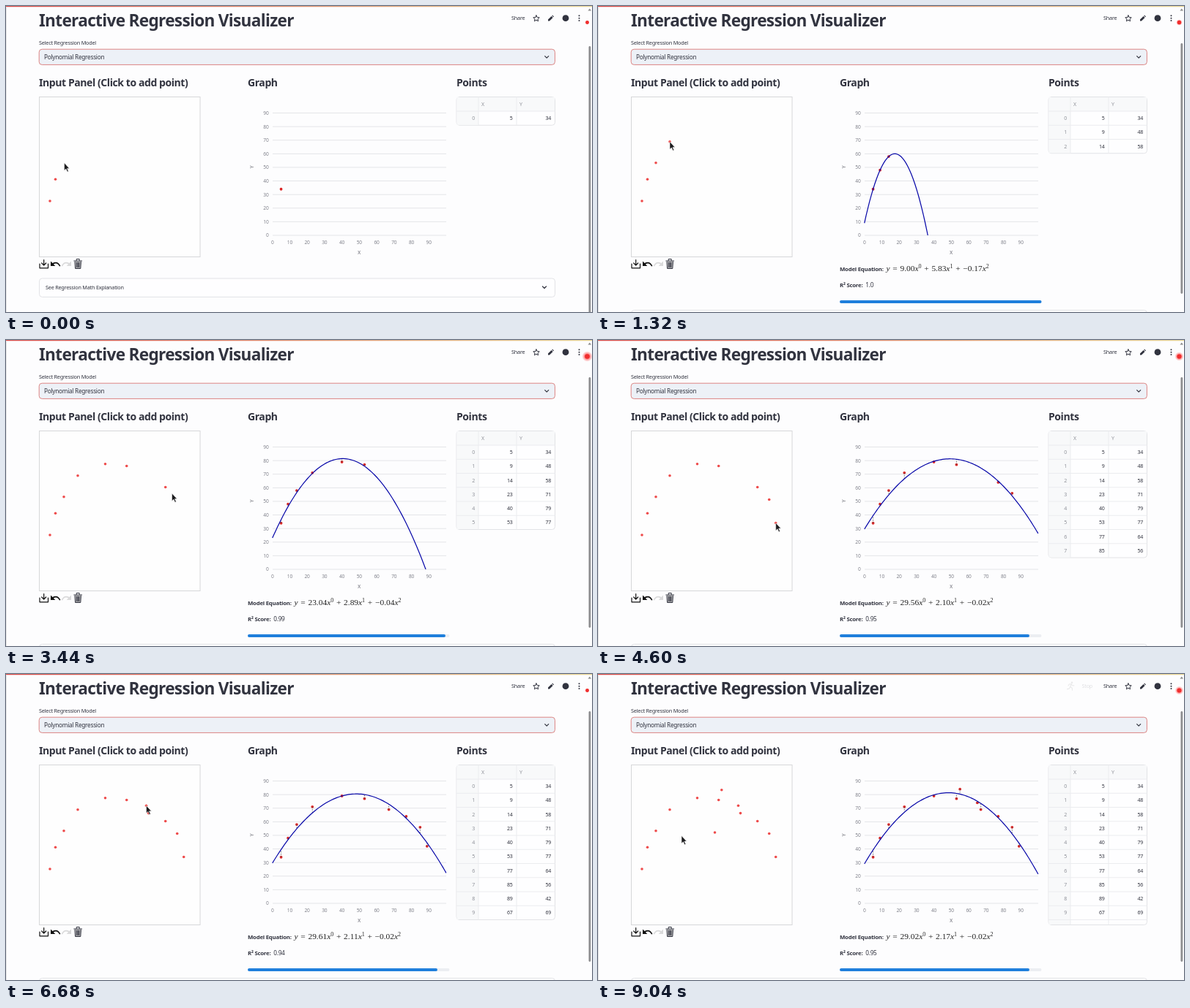
An HTML page that plays this animation: 800 by 419 pixels, repeating every 9080 ms.

```html
<!DOCTYPE html>
<html lang="en">
<head>
<meta charset="utf-8">
<title>Interactive Regression Visualizer</title>
<style>
  html, body { margin: 0; width: 100%; height: 100%; overflow: hidden; background: #fdfdfe; }
  svg { display: block; width: 800px; height: 419px; }
  text { font-family: "Noto Sans", "Open Sans", sans-serif; letter-spacing: -.03em; fill: #31333f; }
  .h1 { font-size: 22.6px; font-weight: 700; }
  .h3 { font-size: 14px; font-weight: 600; }
  .body { font-size: 8.2px; }
  .strong { font-size: 7.8px; font-weight: 600; }
  .small { font-size: 7.25px; }
  .cell { font-size: 7px; }
  .axis { font-size: 6.6px; fill: #80828b; }
  .name { fill: #5f616b; }
  .dim { fill: #8f9199; }
  .end { text-anchor: end; }
  .mid { text-anchor: middle; }
  .math { font: 11.4px "Liberation Serif", serif; letter-spacing: 0; word-spacing: .9px; fill: #222; }
  .math .v { font-style: italic; }
  .math .sup { font-size: 8px; }
  .line { fill: none; stroke: #31333f; stroke-width: 1.2; stroke-linecap: round; stroke-linejoin: round; }
  .box { fill: #fefeff; stroke: #e2e3e6; }
  .rule { fill: none; stroke: #ebecef; stroke-width: 1; }
</style>
</head>
<body>
<svg viewBox="0 0 800 419">
  <defs>
    <linearGradient id="strip"><stop stop-color="#d94a48"/><stop offset="1" stop-color="#e9d795"/></linearGradient>
    <radialGradient id="glow"><stop offset=".4" stop-color="#ff3b3b" stop-opacity=".7"/><stop offset="1" stop-color="#ff3b3b" stop-opacity="0"/></radialGradient>
    <clipPath id="plot"><rect x="363" y="128" width="238.5" height="186"/></clipPath>
    <clipPath id="sheet"><rect x="614" y="123.5" width="137" height="220.5"/></clipPath>
  </defs>
  <rect width="800" height="1.2" fill="url(#strip)"/>
  <path d="M.5 1V419" stroke="#e4e4e6"/>

  <text class="h1" x="45" y="28">Interactive Regression Visualizer</text>
  <text class="small" x="45" y="52.5">Select Regression Model</text>
  <rect x="45.2" y="59.2" width="704.2" height="21.2" rx="4" fill="#edf1f7" stroke="#dc8583"/>
  <text class="body" x="52" y="73">Polynomial Regression</text>
  <path class="line" d="M735.7 68.7l2.5 2.5l2.5-2.5"/>
  <text class="h3" x="45" y="110">Input Panel (Click to add point)</text>
  <text class="h3" x="330" y="110">Graph</text>
  <text class="h3" x="615" y="110">Points</text>

  <text class="small" x="690" y="19.3">Share</text>
  <path class="line" style="stroke-width:1" d="M724 12.8l1.2 2.7l3 .3l-2.2 2l.6 3l-2.6-1.6l-2.6 1.6l.6-3l-2.2-2l3-.3z"/>
  <path d="M740 20.5v-2l4.6-4.6l2 2l-4.6 4.6zM745.2 13.3l.8-.8l2 2l-.8.8z" fill="#31333f"/>
  <circle cx="764" cy="16.7" r="4.4" fill="#31333f"/>
  <g fill="#31333f"><circle cx="782.5" cy="13.3" r="1"/><circle cx="782.5" cy="16.7" r="1"/><circle cx="782.5" cy="20.1" r="1"/></g>
  <path d="M794.5 6.5l2.3-3l2.3 3z" fill="#8b8b8b"/>

  <rect x="45.5" y="124.5" width="219.5" height="219" fill="#fefefe" stroke="#d6d7d9"/>
  <path class="line" style="stroke:#111" d="M51.7 347.5v7.5m-3-3l3 3l3-3M46 353v5.8h11.5v-5.8"/>
  <path id="undo" d="M61 349.5v6.5h6.3l-2.4-2.4q5-3 8 3l1.6-.7q-4-8-11-3.8z" fill="#111"/>
  <use href="#undo" transform="matrix(-1 0 0 1 150 0)" opacity=".15"/>
  <path d="M94 349.5h8.4l-.8 10h-6.8z" fill="#a9a9ac"/>
  <path class="line" style="stroke-width:1" d="M92.8 349h10.8M96.2 348.5v-2h4v2M94 350.5l.6 9h7.2l.6-9M96.7 351.5v6M98.2 351.5v6M99.8 351.5v6"/>

  <g id="axes"></g>
  <g id="result"></g>
  <g id="dots" fill="#ee4b4b"></g>
  <g id="running">
    <circle cx="647" cy="11.8" r="1.3" fill="#777"/>
    <path class="line" style="stroke:#777;stroke-width:1.1" d="M646 13.5l-1.3 4l2.6 1.8l.2 3M644.7 17.5l-1.5 2.6l-2.7.5M642 15.8l1.5-2l2.5-.2l1.7 2.2l2 .1"/>
    <text class="small" x="660.5" y="19.3">Stop</text>
  </g>
  <circle id="halo" cx="793.5" cy="22.5" fill="url(#glow)"/>
  <circle id="rec" cx="793.5" cy="22.5" fill="#f02e2e"/>
  <path id="cursor" d="M0 0V10.4L2.4 8.2L4.2 12.3L5.8 11.6L4 7.6H7Z" fill="#1c1c1e" stroke="#fff" stroke-width=".5"/>
</svg>
<script>
const LOOP = 9080, LAG = 600;
// panel x, panel y, click time, data x, data y
const points = [
  [60, 267, -900, 5, 34], [67.5, 237.3, -150, 9, 48], [79, 214.8, 150, 14, 58],
  [98, 185.8, 1250, 23, 71], [135.5, 169.8, 1800, 40, 79], [164.7, 172.5, 2080, 53, 77],
  [217.7, 201.5, 3150, 77, 64], [233.7, 218.5, 3700, 85, 56], [242.7, 250.5, 4560, 89, 42],
  [194.5, 190.6, 5700, 67, 69], [191.5, 180.2, 6640, 65, 74], [168.8, 158.8, 7500, 55, 84],
  [159.5, 217, 8650, 51, 57]
];
const path = [[0, 79.5, 214.8], [2360, 197.5, 182], [3440, 226.5, 210], [9040, 114, 221.5]];
for (const [x, y, t] of points.slice(2)) path.push([t - 80, x, y], [t + 80, x, y]);
path.sort((a, b) => a[0] - b[0]);

const $ = id => document.getElementById(id);
const px = x => 363.7 + 2.372 * x;
const py = y => 314 - 1.861 * y;
const clamp = v => Math.max(0, Math.min(1, v));
const sum = (list, f) => list.reduce((s, v) => s + f(v), 0);
const text = (cls, x, y, s, more = '') => `<text class="${cls}" x="${x}" y="${y}" ${more}>${s}</text>`;

function drawAxes() {
  let out = text('axis name mid', 482, 339.5, 'X')
    + text('axis name mid', 0, 0, 'Y', 'transform="translate(337.5 220.5) rotate(-90)"');
  for (let v = 0; v < 100; v += 10) {
    out += `<path d="M364 ${py(v)}H601" stroke="#e4e5e8"/>`
      + text('axis end', 358.5, py(v) + 2.4, v) + text('axis mid', px(v), 325.7, v);
  }
  $('axes').innerHTML = out;
}

// Quadratic least squares; the tiny ridge gives the minimum-norm answer for two points.
function fit(data) {
  const n = data.length, ridge = 1e-6;
  const mx = sum(data, p => p[0]) / n, mz = sum(data, p => p[0] ** 2) / n, my = sum(data, p => p[1]) / n;
  const cov = (f, g) => sum(data, p => f(p) * g(p));
  const dx = p => p[0] - mx, dz = p => p[0] ** 2 - mz, dy = p => p[1] - my;
  const xx = cov(dx, dx) + ridge, zz = cov(dz, dz) + ridge, xz = cov(dx, dz), xy = cov(dx, dy), zy = cov(dz, dy);
  const det = xx * zz - xz * xz;
  const b = (xy * zz - zy * xz) / det, c = (zy * xx - xy * xz) / det, a = my - b * mx - c * mz;
  const at = x => a + b * x + c * x * x;
  return { coef: [a, b, c], at, r2: 1 - sum(data, p => (p[1] - at(p[0])) ** 2) / cov(dy, dy) };
}

function table(data) {
  const row = 19.25, bottom = Math.min(343.5, 144 + row * data.length), h = bottom - 124.5;
  let out = `<rect class="box" x="615" y="124.5" width="134.5" height="${h}" rx="4"/>
    <path d="M615.5 125H749V144H645V${bottom - .5}H615.5Z" fill="#f8f9fa"/>
    <path class="rule" d="M645 124.5V${bottom}M697 124.5V${bottom}"/>`
    + text('cell dim', 649, 136.7, 'X') + text('cell dim', 701, 136.7, 'Y');
  data.forEach(([x, y], i) => {
    const top = 144 + row * i, base = top + 12.2;
    out += `<path class="rule" d="M615 ${top}H749.5"/>` + text('cell dim end', 640, base, i)
      + text('cell end', 691.5, base, x) + text('cell end', 744, base, y);
  });
  return `<g clip-path="url(#sheet)">${out}</g>`;
}

function model(data) {
  const { coef, at, r2 } = fit(data);
  const curve = Array.from({ length: 101 }, (_, x) => `${px(x)} ${py(at(x)).toFixed(2)}`).join('L');
  const gaps = data.map(([x, y]) => `M${px(x)} ${py(y)}V${py(at(x))}`).join('');
  const terms = coef.map((c, i) => `${c.toFixed(2).replace('-', '−')}<tspan class="v">x</tspan><tspan class="sup" dy="-4">${i}</tspan>`);
  const score = r2 > .995 ? '1.0' : String(+r2.toFixed(2));
  const width = 275.5 * Math.floor(r2 * 100 + 1e-3) / 100;
  return {
    curve: `<path d="${gaps}" stroke="#555" stroke-width=".8" stroke-dasharray="1.6 1.6"/>
      <path d="M${curve}" fill="none" stroke="#0606a8" stroke-width="1.2" clip-path="url(#plot)"/>`,
    info: text('strong', 330, 362.5, 'Model Equation:')
      + text('math', 393.5, 363, '<tspan class="v">y</tspan> = ' + terms.join('<tspan dy="4"> + </tspan>'))
      + text('strong', 330, 385.3, 'R² Score:') + text('body', 365.3, 385.3, score)
      + `<rect x="330" y="403" width="275.5" height="4" rx="2" fill="#eceef2"/>
         <rect x="330" y="403" width="${width}" height="4" rx="2" fill="#1f7fdc"/>`
  };
}

function drawResult(n) {
  const data = points.slice(0, n).map(p => p.slice(3));
  const m = n > 1 ? model(data) : { curve: '', info: '' };
  const top = n > 1 ? 416.5 : 373;
  const marks = data.map(([x, y]) => `<circle cx="${px(x)}" cy="${py(y)}" r="1.9" fill="#dc2626"/>`).join('');
  $('result').innerHTML = table(data) + marks + m.curve + m.info
    + `<rect class="box" x="45.5" y="${top}" width="704" height="25.5" rx="4"/>`
    + text('small', 54, top + 14.7, 'See Regression Math Explanation')
    + `<path class="line" d="M732.5 ${top + 11}l2.5 2.5l2.5-2.5"/>
       <rect x="795.5" y="${n > 1 ? 51 : 55}" width="2.8" height="${n > 1 ? 343 : 370}" rx="1.4" fill="#8d8d8f"/>`;
}

function cursorAt(t) {
  const i = path.findIndex(k => k[0] > t);
  if (i < 0) return path[path.length - 1].slice(1);
  const [t0, x0, y0] = path[i - 1], [t1, x1, y1] = path[i];
  const u = (t - t0) / (t1 - t0), e = u * u * (3 - 2 * u);
  return [x0 + (x1 - x0) * e, y0 + (y1 - y0) * e];
}

let shownData = -1, shownDots = -1;
function frame(now) {
  const t = now % LOOP;
  const dots = points.filter(p => p[2] <= t), n = dots.filter(p => p[2] + LAG <= t).length;
  if (dots.length !== shownDots) {
    shownDots = dots.length;
    $('dots').innerHTML = dots.map(p => `<circle cx="${p[0]}" cy="${p[1]}" r="1.8"/>`).join('');
  }
  if (n !== shownData) drawResult(shownData = n);
  const busy = Math.max(...dots.slice(n).map(p => clamp((t - p[2] - 370) / 150)), 0);
  $('running').setAttribute('opacity', busy);
  const pulse = (1 - Math.cos(2 * Math.PI * t / 6900)) / 2;
  $('rec').setAttribute('r', 2.4 + .9 * pulse);
  $('halo').setAttribute('r', 3 + 4.2 * pulse);
  $('cursor').setAttribute('transform', `translate(${cursorAt(t)})`);
}

drawAxes();
const start = performance.now();
(function tick() {
  frame(performance.now() - start);
  requestAnimationFrame(tick);
})();
</script>
</body>
</html>
```
